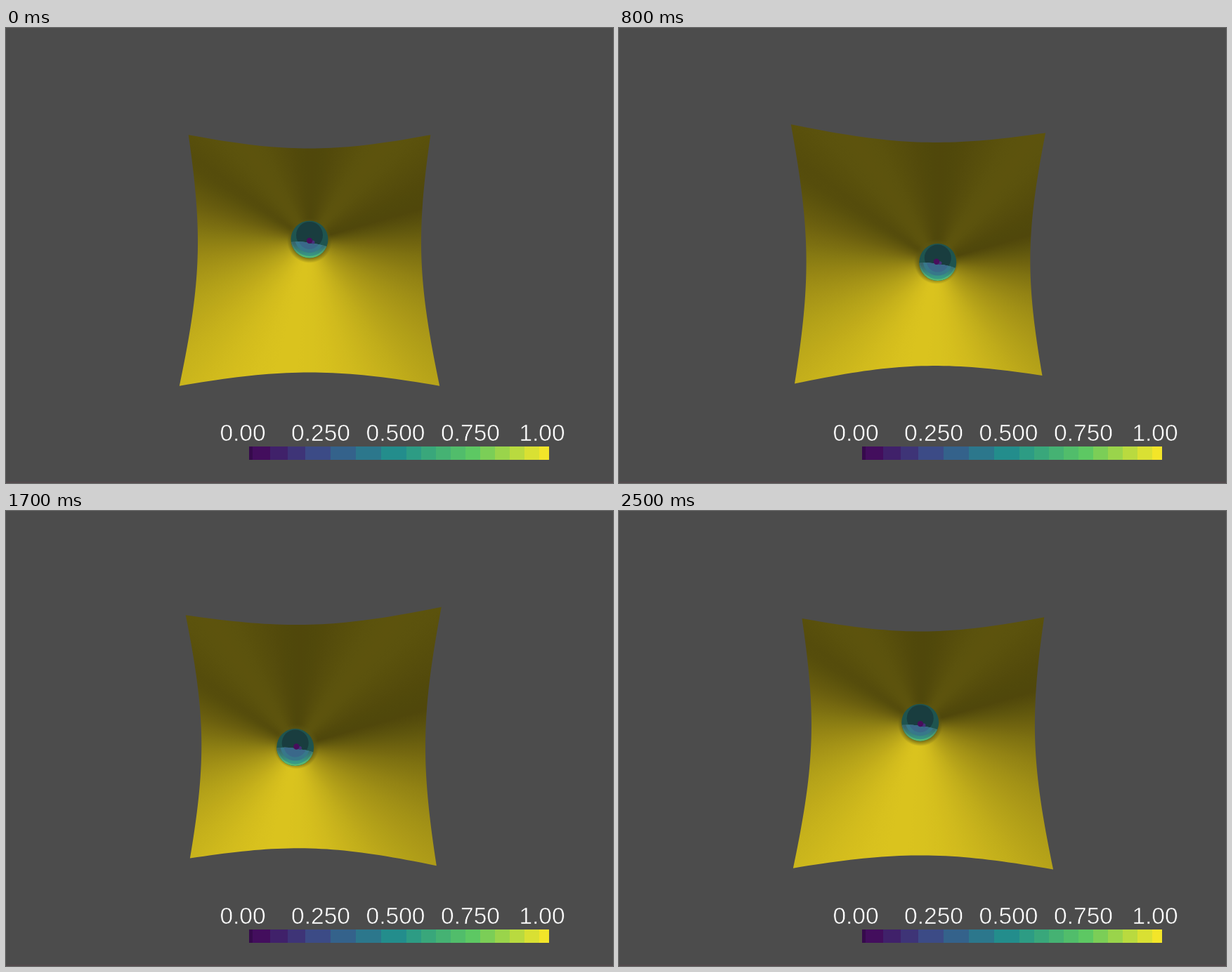
Write an HTML page with a canvas that moves like this. It is 864x648 px and loops after 2.6 s.

```html
<!DOCTYPE html>
<html lang="en">
<head>
<meta charset="utf-8">
<title>Orbiting surface</title>
<style>
  html, body { margin: 0; width: 100%; height: 100%; overflow: hidden; background: #4c4c4c; }
  canvas { display: block; }
</style>
</head>
<body>
<canvas id="stage" width="864" height="648"></canvas>
<script>
const ctx = document.getElementById('stage').getContext('2d');
const LOOP = 2600, STEP = 100;
const RAD = Math.PI / 180;
const TURN = 14.08 * RAD;
const CX = 432, CY = 324.5;
const CORNER = 178.5, MID = 159.3, ORBIT = 21.6;
const BACK = '#4c4c4c';
const BAR = { left: 346, right: 773, top: 596, height: 19 };
const VIRIDIS = [[68, 1, 84], [59, 82, 139], [33, 145, 140], [94, 201, 98], [253, 231, 37]];

const rgb = c => `rgb(${c.map(Math.round).join(',')})`;

function viridis(v) {
  const x = v * (VIRIDIS.length - 1);
  const i = Math.min(Math.floor(x), VIRIDIS.length - 2);
  return rgb(VIRIDIS[i].map((a, k) => a + (VIRIDIS[i + 1][k] - a) * (x - i)));
}

// Key light from below, over a dim and slightly rippled fill.
function brightness(deg) {
  const key = Math.max(0, (Math.cos((deg - 99) * RAD) + 0.42) / 1.42);
  const fill = 0.395 + 0.03 * Math.cos(5 * (deg - 308) * RAD);
  return fill + (1 - fill) * key;
}

function disc(x, y, r, color) {
  ctx.fillStyle = color;
  ctx.beginPath();
  ctx.arc(x, y, r, 0, 2 * Math.PI);
  ctx.fill();
}

function fade(y0, y1, from, to) {
  const g = ctx.createLinearGradient(0, y0, 0, y1);
  g.addColorStop(0, from);
  g.addColorStop(1, to);
  return g;
}

// Sheet outline: four bowed sides in perspective, far side towards (dx, dy).
function outline(dx, dy) {
  const n = 40;
  ctx.beginPath();
  for (let side = 0; side < 4; side++) {
    const c = Math.round(Math.cos(side * Math.PI / 2));
    const q = Math.round(Math.sin(side * Math.PI / 2));
    for (let i = 0; i < n; i++) {
      const s = i / n * 2 - 1;
      const m = MID + (CORNER - MID) * s * s;
      const px = m * (s * c + q), py = m * (s * q - c);
      const depth = 1 + 0.036 * (px * dx + py * dy) / CORNER;
      const sag = 1.4 * (1 - s * s);
      ctx.lineTo(CX + px / depth - dx * sag, CY + py / depth - dy * sag);
    }
  }
  ctx.closePath();
}

function drawSheet(dx, dy, hx, hy) {
  const light = ctx.createConicGradient(0, hx, hy);
  for (let deg = 0; deg <= 360; deg += 4) {
    const b = brightness(deg);
    light.addColorStop(deg / 360, rgb([218 * b, 195 * b, 30 * b]));
  }
  outline(dx, dy);
  ctx.fillStyle = light;
  ctx.fill();
}

function drawWell(dx, dy, hx, hy) {
  ctx.save();
  ctx.translate(hx, hy);

  const rim = ctx.createRadialGradient(0, 0, 25, 0, 0, 32);
  rim.addColorStop(0, 'rgba(92,86,19,.7)');
  rim.addColorStop(1, 'rgba(92,86,19,0)');
  disc(0, 0, 32, rim);

  const ox = dx * 2, oy = dy * 2;
  ctx.beginPath();
  ctx.arc(ox, oy, 26.5, 0, 2 * Math.PI);
  ctx.clip();
  disc(ox, oy, 28, '#1f544f');
  disc(ox, oy - 6, 19, '#193d3f');

  // Lit lower wall
  ctx.save();
  ctx.beginPath();
  ctx.moveTo(-30, 2);
  ctx.quadraticCurveTo(-8, 0, 2, 4);
  ctx.quadraticCurveTo(14, 4, 30, 10);
  ctx.lineTo(30, 32);
  ctx.lineTo(-30, 32);
  ctx.clip();
  disc(ox, oy, 28, fade(4, 22, '#3c6f68', '#56b874'));
  disc(ox, oy - 1, 25, fade(4, 22, '#38656c', '#389a86'));
  disc(ox, oy - 2, 21, '#37788a');
  disc(ox, oy - 2, 16, '#3a688a');
  ctx.restore();

  disc(5, 2, 2.5, '#46307a');
  disc(0, 0, 4.2, '#480d5c');
  ctx.restore();
}

// Wide bands in the blues, narrow ones towards yellow.
const bandWidth = x => x < 426 ? 25 : x < 570 ? 36 : 21;

function drawBar() {
  const { left, right, top, height } = BAR;
  ctx.fillStyle = '#360a4c';
  ctx.fillRect(left, top, 5, height);
  for (let x = left + 5; x < right;) {
    const w = Math.min(bandWidth(x), right - x);
    ctx.fillStyle = viridis((x + w / 2 - left) / (right - left));
    ctx.fillRect(x, top, w, height);
    x += w;
  }
}

function drawLabels() {
  ctx.font = '33.5px "Liberation Sans", Arial, sans-serif';
  ctx.textAlign = 'center';
  ctx.lineJoin = 'round';
  ctx.lineWidth = 0.6;
  ctx.fillStyle = '#fff';
  ctx.strokeStyle = BACK;
  ['0.00', '0.250', '0.500', '0.750', '1.00'].forEach((text, i) => {
    const x = 341.5 + 106.5 * i - (i % 4 ? 0 : 4.5);
    ctx.fillText(text, x, 588);
    ctx.strokeText(text, x, 588); // thins the strokes
  });
}

function draw(now) {
  const angle = Math.floor(now % LOOP / STEP) * TURN;
  const dx = Math.sin(angle), dy = -Math.cos(angle);
  const hx = CX + ORBIT * dx, hy = CY + ORBIT * dy;

  ctx.fillStyle = BACK;
  ctx.fillRect(0, 0, 864, 648);
  ctx.fillStyle = '#52494c';
  ctx.fillRect(0, 646, 864, 2);
  drawSheet(dx, dy, hx, hy);
  drawWell(dx, dy, hx, hy);
  drawBar();
  drawLabels();
}

const start = performance.now();
function tick() {
  draw(performance.now() - start);
  requestAnimationFrame(tick);
}
tick();
</script>
</body>
</html>
```
